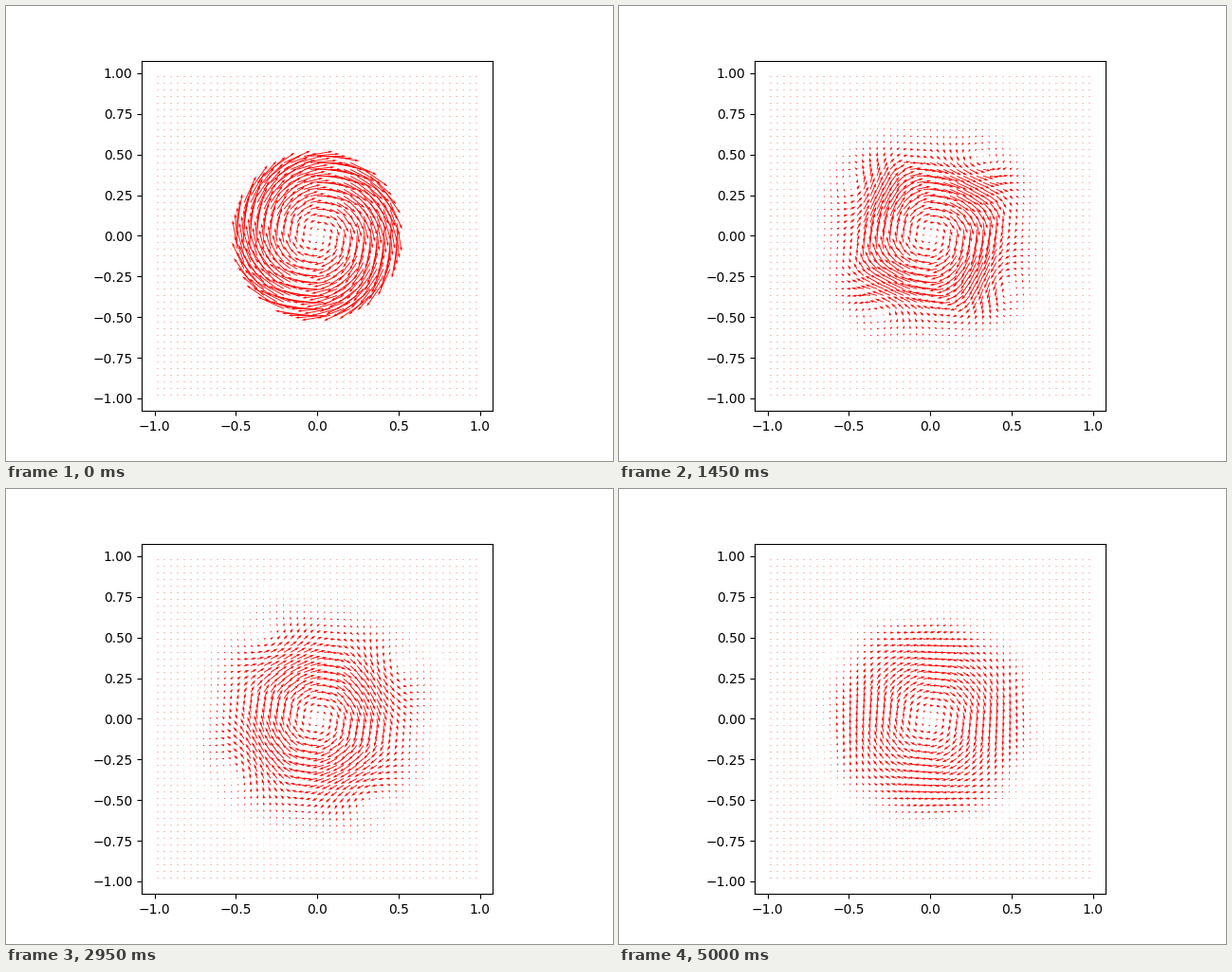
Animation, 640 px wide and 480 px high, one loop 5.05 s. Source, as a matplotlib script:

```python
import numpy as np
import matplotlib.pyplot as plt
from matplotlib.animation import FuncAnimation

N = 49          # cells per side of the square [-1, 1] x [-1, 1]
H = 2 / N
DT = 0.1
FRAMES = 101

axis = (np.arange(N) - N // 2) * H
X, Y = np.meshgrid(axis, axis)
ROWS, COLS = np.mgrid[0:N, 0:N].astype(float)

# Fourier symbols of the central difference and the five-point Laplacian
wave = 2 * np.pi * np.fft.fftfreq(N)
KX, KY = np.meshgrid(wave, wave)
DX, DY = 1j * np.sin(KX), 1j * np.sin(KY)
LAP = 2 * np.cos(KX) + 2 * np.cos(KY) - 4
LAP[0, 0] = 1


def spinning_disc(radius=0.5):
    inside = np.hypot(X, Y) < radius
    return np.where(inside, Y, 0.0), np.where(inside, -X, 0.0)


def sample(field, row, col):
    """Bilinear lookup at fractional grid positions."""
    r = np.clip(row, 0, N - 1)
    c = np.clip(col, 0, N - 1)
    r0 = np.minimum(r.astype(int), N - 2)
    c0 = np.minimum(c.astype(int), N - 2)
    fr, fc = r - r0, c - c0
    low = field[r0, c0] * (1 - fc) + field[r0, c0 + 1] * fc
    high = field[r0 + 1, c0] * (1 - fc) + field[r0 + 1, c0 + 1] * fc
    return low * (1 - fr) + high * fr


def advect(u, v):
    row, col = ROWS - v * DT / H, COLS - u * DT / H
    return sample(u, row, col), sample(v, row, col)


def project(u, v):
    """Remove the divergent part of the velocity."""
    fu, fv = np.fft.fft2(u), np.fft.fft2(v)
    p = (DX * fu + DY * fv) / LAP
    p[0, 0] = 0
    return (np.fft.ifft2(fu - DX * p).real,
            np.fft.ifft2(fv - DY * p).real)


def simulate():
    states = [spinning_disc()]
    while len(states) < FRAMES:
        states.append(project(*advect(*states[-1])))
    return states


flow = simulate()
scale = 1.8 * np.hypot(*flow[0]).mean() * N

fig, ax = plt.subplots(figsize=(6.4, 4.8), dpi=100)
arrows = ax.quiver(X, Y, *flow[0], color="red", scale=scale)
ax.set_aspect("equal")


def update(i):
    arrows.set_UVC(*flow[i])
    return (arrows,)


anim = FuncAnimation(fig, update, frames=FRAMES, interval=50,
                     repeat=True, repeat_delay=0, blit=False)
plt.show()
```
